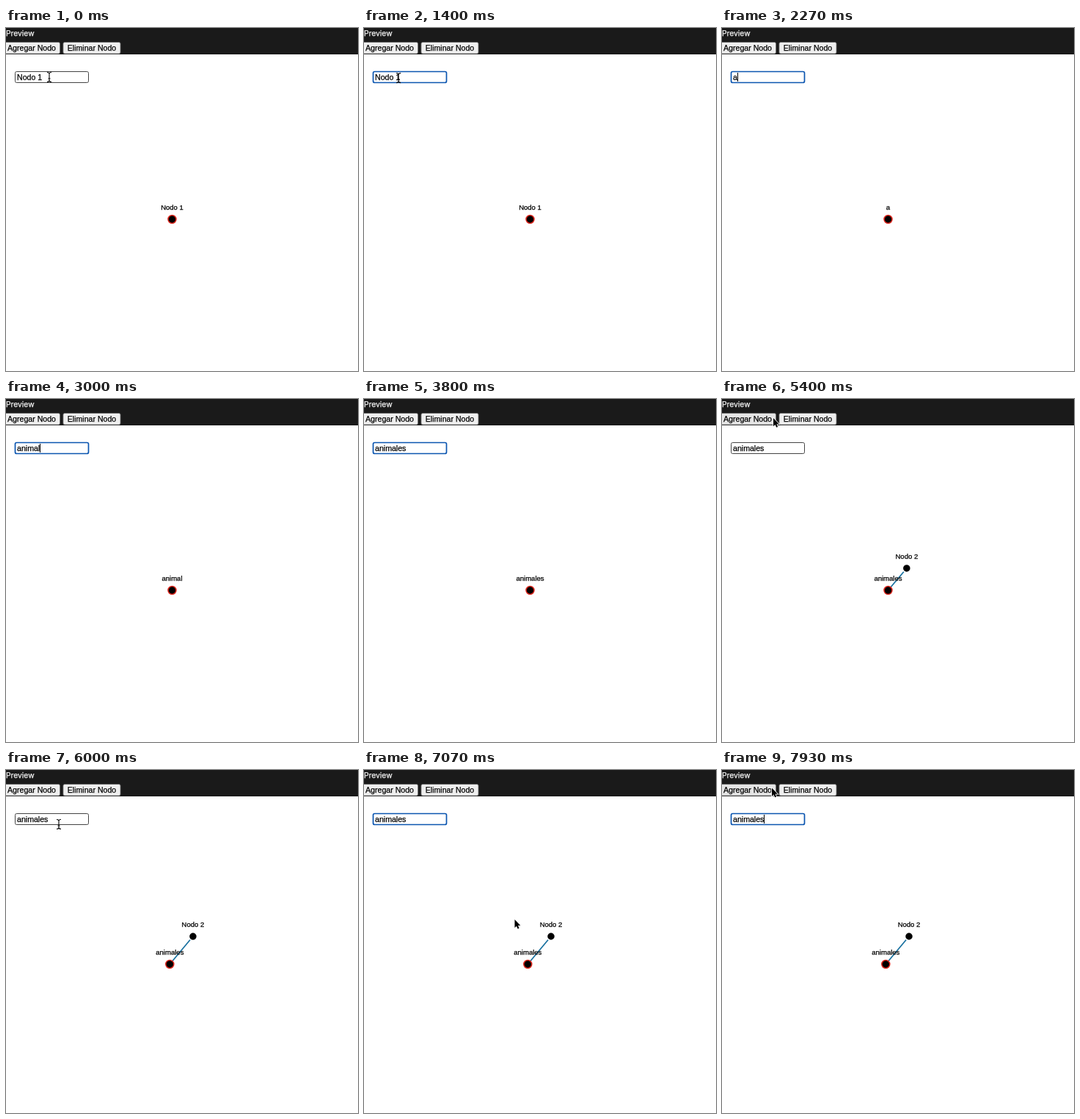
An HTML page with a canvas for the animation above (8 s loop, 480x468 px).

```html
<!DOCTYPE html>
<html lang="es">
<head>
<meta charset="utf-8">
<title>Preview</title>
<style>
  html, body { margin: 0; width: 100%; height: 100%; overflow: hidden; background: #fff; }
  canvas { display: block; }
</style>
</head>
<body>
<canvas id="stage" width="480" height="468"></canvas>
<script>
const ctx = document.getElementById('stage').getContext('2d');
const UI_FONT = '10.6px "Liberation Sans", Arial, sans-serif';
const LABEL_FONT = '9.54px "Liberation Sans", Arial, sans-serif';
const TITLE_FONT = '10.3px Inter, sans-serif';
const FIELD = { x: 12.5, y: 59.5, w: 100, h: 15, textX: 15, baseline: 70.5 };
const WORD = 'animales';

// Moments of the story, in ms
const LOOP = 8000;
const PRESS = 70, RELEASE = 410;
const SELECT = 1230;
const TYPE = 2270, KEY_STEP = 142;
const REAPPEAR = 4200;
const ADD = 5400;
const REFOCUS = 6500;
const BLINK = 525;
const LAST_KEY = TYPE + (WORD.length - 1) * KEY_STEP;

const START = { x: 59, y: 67 };
const MOVES = [
  { at: SELECT, lasts: 570, x: 4, y: 72 },
  { at: TYPE, lasts: 1900, x: 22, y: 69 },
  { at: REAPPEAR, lasts: 600, x: 72, y: 52 },
  { at: 4800, lasts: 400, x: 70, y: 26 },
  { at: 5880, lasts: 120, x: 72, y: 74 },
  { at: 6000, lasts: 450, x: 238, y: 259 },
  { at: 6800, lasts: 800, x: 116, y: 53 },
  { at: 7600, lasts: 320, x: 68, y: 24.5 }
];

const between = (t, from, to) => t >= from && t < to;
const clamp = k => Math.min(1, Math.max(0, k));
const ease = k => k * k * (3 - 2 * k);
const mix = (a, b, k) => a + (b - a) * k;
const blend = (p, q, k) => ({ x: mix(p.x, q.x, k), y: mix(p.y, q.y, k) });

const pointerAt = t =>
  MOVES.reduce((p, move) => blend(p, move, ease(clamp((t - move.at) / move.lasts))), START);

const valueAt = t =>
  t < TYPE ? 'Nodo 1' : WORD.slice(0, 1 + Math.floor((t - TYPE) / KEY_STEP));

const isFocused = t => between(t, PRESS, ADD) || t >= REFOCUS;

function caretVisible(t) {
  if (!isFocused(t) || between(t, SELECT, TYPE) || between(t, TYPE, LAST_KEY)) return between(t, TYPE, LAST_KEY);
  const lastInput = t < TYPE ? RELEASE : t < REFOCUS ? LAST_KEY : REFOCUS;
  return t < lastInput || Math.floor((t - lastInput) / BLINK) % 2 === 0;
}

function text(str, x, y, font, align = 'left', color = '#000') {
  ctx.font = font;
  ctx.textAlign = align;
  ctx.fillStyle = ctx.strokeStyle = color;
  ctx.lineWidth = 0.25;
  ctx.fillText(str, x, y);
  ctx.strokeText(str, x, y);
}

function paint(path, fill, stroke, lineWidth) {
  ctx.fillStyle = fill;
  ctx.fill(path);
  ctx.strokeStyle = stroke;
  ctx.lineWidth = lineWidth;
  ctx.stroke(path);
}

function roundBox(x, y, w, h, radius) {
  const path = new Path2D();
  path.roundRect(x, y, w, h, radius);
  return path;
}

function button(label, x, w, pointer) {
  const hovered = between(pointer.x, x, x + w) && between(pointer.y, 19, 36);
  paint(roundBox(x + 0.5, 19.5, w - 1, 15.5, 2), hovered ? '#e5e5e5' : '#efefef', '#777', 0.8);
  text(label, x + w / 2, 31, UI_FONT, 'center');
}

function drawHeader(pointer) {
  ctx.fillStyle = '#1a1a1a';
  ctx.fillRect(0, 0, 480, 36);
  text('Preview', 0, 11, TITLE_FONT, 'left', '#f2f2f2');
  button('Agregar Nodo', -4, 78, pointer);
  button('Eliminar Nodo', 77.5, 79, pointer);
}

function drawField(t, value, pointer) {
  const { x, y, w, h, textX, baseline } = FIELD;
  const focused = isFocused(t);
  paint(roundBox(x, y, w, h, 2), '#fff', focused ? '#0b55b0' : '#444', focused ? 1.7 : 1);

  ctx.font = UI_FONT;
  const widthOf = n => ctx.measureText(value.slice(0, n)).width;
  const end = textX + widthOf(value.length);
  if (between(t, SELECT, TYPE)) {
    let first = value.length;
    while (first > 0 && textX + (widthOf(first) + widthOf(first - 1)) / 2 > pointer.x) first--;
    const left = textX + widthOf(first);
    ctx.fillStyle = '#b3d7fe';
    ctx.fillRect(left, 61, end - left, 12);
  }
  text(value, textX, baseline, UI_FONT);
  if (caretVisible(t)) {
    ctx.fillStyle = '#000';
    ctx.fillRect(Math.round(end), 61, 1, 12);
  }
}

function node(name, { x, y }, outline) {
  const disc = new Path2D();
  disc.arc(x, y, 5.5, 0, Math.PI * 2);
  paint(disc, '#000', outline, 1.5);
  text(name, x, y - 12.6, LABEL_FONT, 'center');
}

function drawGraph(t, name) {
  // The new node pushes its parent away until both settle
  const k = t < ADD ? 0 : 1 - Math.exp((ADD - t) / 130);
  const root = blend({ x: 226.5, y: 261 }, { x: 223.3, y: 265 }, k);
  const child = blend({ x: 251.8, y: 231 }, { x: 255, y: 227 }, k);
  if (t >= ADD) {
    ctx.beginPath();
    ctx.moveTo(root.x, root.y);
    ctx.lineTo(child.x, child.y);
    ctx.strokeStyle = '#17709f';
    ctx.lineWidth = 1.7;
    ctx.stroke();
    node('Nodo 2', child, '#fff');
  }
  node(name, root, '#dd261d');
}

const BEAM = new Path2D('M-3-6.5Q0-6.5 0-4.5Q0-6.5 3-6.5M0-5V5M-3 6.5Q0 6.5 0 4.5Q0 6.5 3 6.5M-1.5 2H1.5');
const ARROW = new Path2D('M0 0V11.2L2.5 8.9L4.2 12.7L6.1 11.9L4.5 8.2H7.9Z');

function drawPointer(t, { x, y }) {
  if (between(t, TYPE, REAPPEAR)) return;
  const overField = between(x, FIELD.x, FIELD.x + FIELD.w) && between(y, FIELD.y, FIELD.y + FIELD.h);
  ctx.save();
  ctx.translate(x, y);
  if (overField || between(t, SELECT, TYPE)) {
    paint(BEAM, 'transparent', '#000', 1.1);
  } else {
    paint(ARROW, '#000', '#fff', 1.5);
    ctx.fill(ARROW);
  }
  ctx.restore();
}

function draw(t) {
  const pointer = pointerAt(t);
  const value = valueAt(t);
  ctx.fillStyle = '#fff';
  ctx.fillRect(0, 0, 480, 468);
  drawHeader(pointer);
  drawGraph(t, value);
  drawField(t, value, pointer);
  drawPointer(t, pointer);
}

function tick() {
  draw(performance.now() % LOOP);
  requestAnimationFrame(tick);
}
tick();
</script>
</body>
</html>
```
